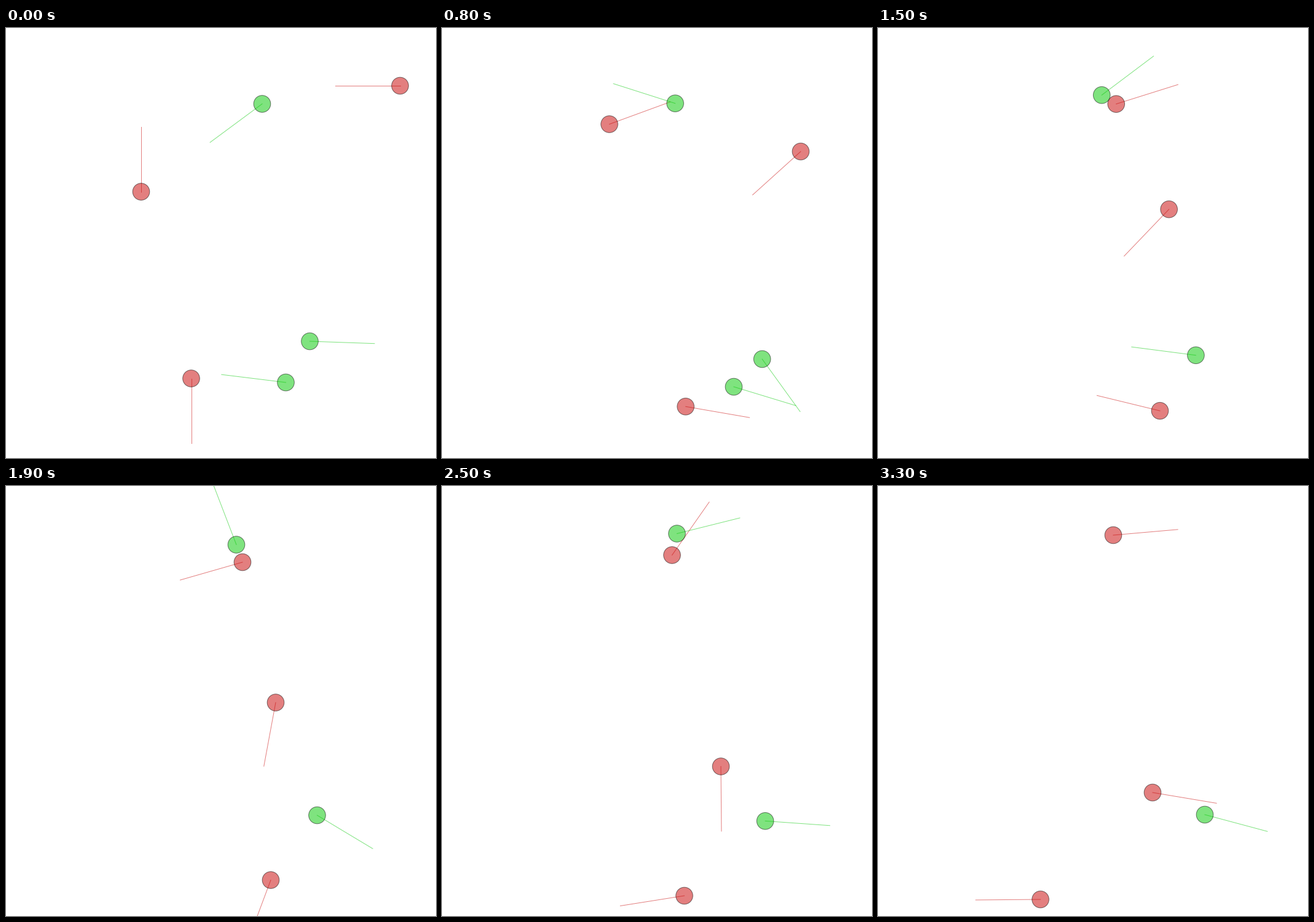
A matplotlib script for the animation above (3.4 s loop, 700 by 700 pixels).

```python
import matplotlib.pyplot as plt
import numpy as np
from matplotlib.animation import FuncAnimation
from matplotlib.patches import Circle

SIZE, DPI = 700, 100
FRAMES, INTERVAL = 34, 100
RADIUS, FEELER, ALPHA = 13.8, 105.5, 0.5
PX = 72 / DPI

HUNTER = ("#c80000", 15)  # colour, pixels per step
PREY = ("#00c800", 4)

# Key poses: step, x, y, heading in degrees (clockwise on screen).
# An agent lives from its first pose to its last.
AGENTS = [
    (HUNTER, [(0, 220, 266.5, -90), (5, 233, 187.5, -73), (12, 349, 136, -18),
              (19, 385, 124, 164), (25, 374.5, 112.5, -55),
              (29, 361.5, 86.5, -104), (33, 383, 80, -5)]),
    (HUNTER, [(0, 301.5, 570.5, 90), (5, 360, 604.5, 26), (12, 447, 623.5, 11.5),
              (19, 431, 641.5, 110.5), (25, 394.5, 667, 171),
              (33, 264.5, 673, 179.5)]),
    (HUNTER, [(0, 641.5, 94, 180), (5, 618.5, 162.5, 122),
              (19, 439, 352.5, 100.5), (25, 454, 456.5, 89.5),
              (33, 447, 499, 9.5)]),
    (PREY, [(0, 417, 123.5, 143.5), (12, 361.5, 116, 202), (19, 375, 95.5, 249),
            (25, 382.5, 77.5, -14), (31, 394, 67, -14)]),
    (PREY, [(0, 494.5, 510, 2), (12, 527.5, 539.5, -79.5), (19, 506.5, 536, 31),
            (29, 532, 538.5, -88.5), (33, 532, 535, 15)]),
    (PREY, [(0, 455.5, 577, 187), (10, 484, 587, 20)]),
]


def direction(deg):
    a = np.radians(deg)
    return np.array([np.cos(a), np.sin(a)])


def pose(keys, speed, t):
    """Position on a Hermite path and the unit vector along it."""
    i = max(j for j in range(len(keys) - 1) if keys[j][0] <= t)
    a, b = keys[i], keys[i + 1]
    span = b[0] - a[0]
    u = (t - a[0]) / span
    p, q = np.array(a[1:3]), np.array(b[1:3])
    m, n = (direction(k[3]) * speed * span for k in (a, b))
    pos = (p + (3 - 2 * u) * u**2 * (q - p)
           + u * (1 - u)**2 * m - u**2 * (1 - u) * n)
    vel = (6 * u * (1 - u) * (q - p)
           + (1 - u) * (1 - 3 * u) * m + u * (3 * u - 2) * n)
    return pos, vel / np.hypot(*vel)


class Agent:
    def __init__(self, ax, kind, keys, z):
        color, self.speed = kind
        self.keys = keys
        self.body = Circle((0, 0), RADIUS, fc=color, lw=0)
        self.rim = Circle((0, 0), RADIUS, fill=False, ec="black", lw=PX)
        self.feeler, = ax.plot([], [], color=color, lw=PX)
        ax.add_patch(self.body)
        ax.add_patch(self.rim)
        self.parts = [self.body, self.rim, self.feeler]
        for part in self.parts:
            part.set(alpha=ALPHA, zorder=z)

    def update(self, t):
        alive = t <= self.keys[-1][0]
        for part in self.parts:
            part.set_visible(alive)
        if alive:
            pos, ahead = pose(self.keys, self.speed, t)
            self.body.center = self.rim.center = tuple(pos)
            self.feeler.set_data(*np.array([pos, pos + FEELER * ahead]).T)


fig = plt.figure(figsize=(SIZE / DPI, SIZE / DPI), dpi=DPI, facecolor="white")
ax = fig.add_axes([0, 0, 1, 1])
ax.axis("off")
agents = [Agent(ax, *spec, z) for z, spec in enumerate(AGENTS, 1)]
ax.set(xlim=(0, SIZE), ylim=(SIZE, 0))


def draw(t):
    for agent in agents:
        agent.update(t)
    return [part for agent in agents for part in agent.parts]


anim = FuncAnimation(fig, draw, frames=FRAMES, interval=INTERVAL,
                     repeat=True, repeat_delay=0, blit=False)
plt.show()
```
